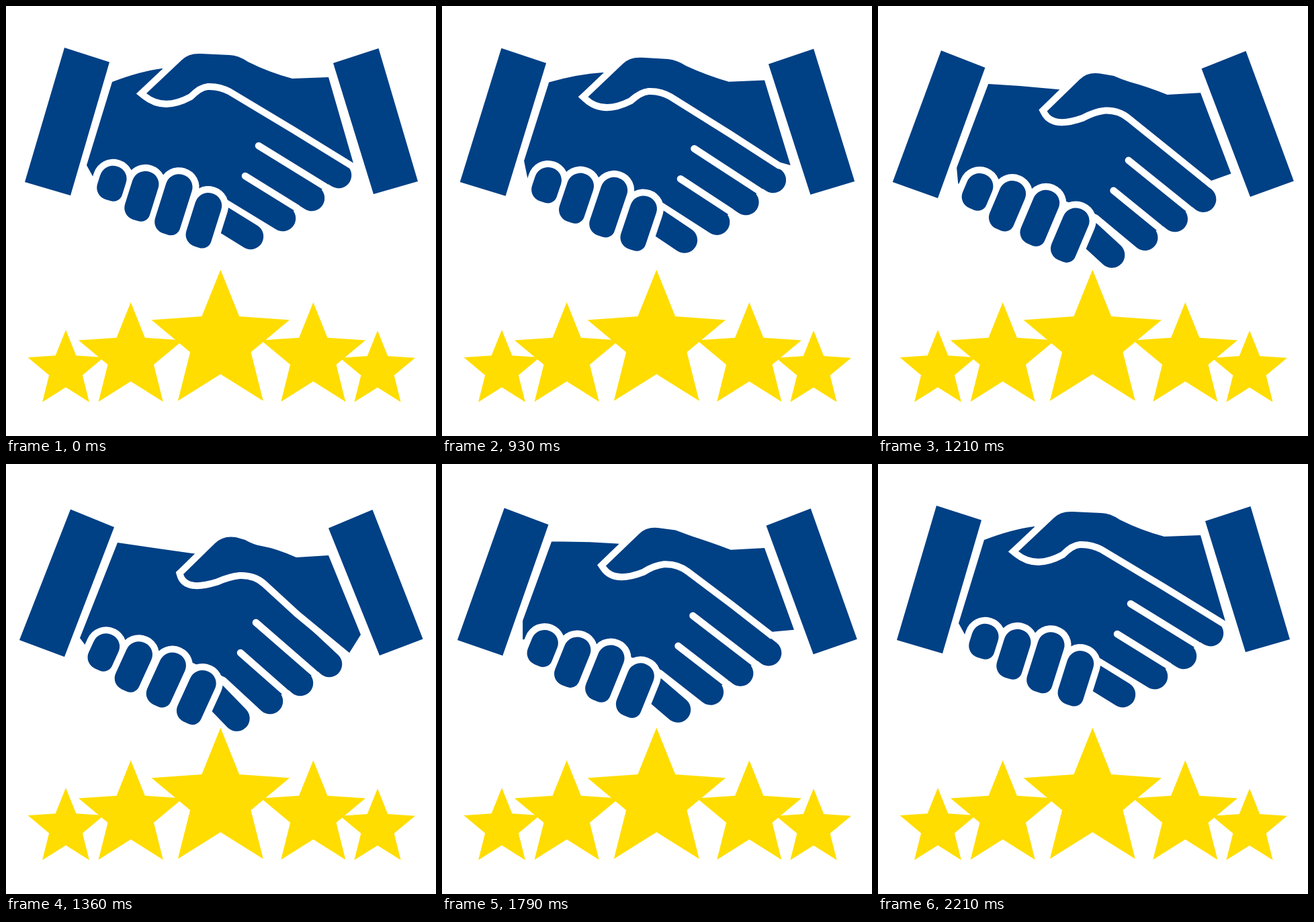
An HTML page with a canvas for the animation above (3.57 s loop, 640x640 px).

```html
<!DOCTYPE html>
<html lang="en">
<head>
<meta charset="utf-8">
<title>Handshake</title>
<style>
html, body { margin: 0; width: 100%; height: 100%; overflow: hidden; background: #fff; }
canvas { display: block; width: 100vmin; height: 100vmin; }
</style>
</head>
<body>
<canvas id="stage" width="640" height="640"></canvas>
<script>
const ctx = document.getElementById('stage').getContext('2d');
const LOOP = 3570, STEP = 71.4;
const BLUE = '#004085', YELLOW = '#ffdd00', WHITE = '#fff';

// Points are [x, y] raised, then [x, y] lowered, then an optional mid-way bulge.
const leftCuff = [[87, 62, 96, 67.5], [154, 83.5, 161, 94], [96, 282, 87, 287], [28, 262, 20, 262]];
const rightCuff = [[554.5, 63, 545.5, 68], [613, 261, 620.5, 260.5], [547, 280, 556, 285], [487, 85, 480, 95.5]];

const fingers = [
  { from: [320, 147, 374, 198], to: [495, 252, 481, 298] },
  { from: [366, 230, 360, 258], to: [455, 286, 438, 326] },
  { from: [338, 271, 340, 304], to: [412, 316, 393, 353] },
  { from: [322, 317, 311, 345], to: [364, 343, 343.5, 378.5] }
];
const notches = [[376, 208, 372, 236], [356, 253, 349, 281]];

const wrist = [[131, 257, 119, 271, -14, -20], [120, 237, 110, 259, 28, -77], [158, 113, 166, 117]];
const wristTop = [[200, 97, 220, 125], [232, 93, 277, 133]];
const palm = [[290, 100, 345, 140], [330, 130, 388, 186], ...fingers.slice(0, 3).map(f => f.to),
  [328, 288, 327, 318], [287, 273, 278, 296], [234, 253, 226, 281], [187, 244, 174, 262]];

// Upper hand: a point, or a control point and a point for a curve
const upperHand = [
  [[209, 130, 264, 164]],
  [[262, 80, 311, 118]],
  [[272, 70, 323, 106], [290, 71, 342, 109]],
  [[333, 73, 356, 113]],
  [[345, 73, 368, 120], [360, 83, 380, 122]],
  [[392, 99, 403, 126], [426, 108, 432, 139]],
  [[480, 106, 480, 136]],
  [[517, 234, 528, 254]],
  [[516, 233, 511, 281, -92, -59]],
  [[430, 180, 437, 220]],
  [[335, 123, 388, 175]],
  [[318, 114, 372, 160], [300, 115, 347, 161]],
  [[287, 116, 330, 163], [272, 131, 312, 171]],
  [[235, 151, 270, 184], [209, 130, 264, 164]]
];

const knuckles = [
  { at: [157.5, 263.5, 145.5, 279.5], len: [52, 56] },
  { at: [202, 282.5, 190, 301], len: [75, 77] },
  { at: [249.5, 295, 238.5, 320.5], len: [92, 84] },
  { at: [294.5, 318.5, 283.5, 346.5], len: [83, 83] }
];

// Top point and size
const stars = [[89, 482, 0.55], [185.7, 441, 0.757], [319.3, 392.5, 1], [457.3, 441, 0.757], [553, 483, 0.545]];

let pose = 0;
const mix = (a, b) => a + (b - a) * pose;

function place([ax, ay, bx, by, cx = 0, cy = 0]) {
  const bulge = pose * (1 - pose);
  return [mix(ax, bx) + cx * bulge, mix(ay, by) + cy * bulge];
}

function fillPath(color, build) {
  ctx.fillStyle = color;
  ctx.beginPath();
  build();
  ctx.closePath();
  ctx.fill();
}

function line(color, width, a, b) {
  ctx.strokeStyle = color;
  ctx.lineWidth = width;
  ctx.lineCap = 'round';
  ctx.beginPath();
  ctx.moveTo(...a);
  ctx.lineTo(...b);
  ctx.stroke();
}

const lineThrough = pts => pts.forEach(p => ctx.lineTo(...place(p)));
const curve = pts => ctx.quadraticCurveTo(...pts.flatMap(place));

function drawStar([x, top, size]) {
  const outer = 108 * size;
  fillPath(YELLOW, () => {
    for (let i = 0; i < 10; i++) {
      const r = i % 2 ? outer * 0.44 : outer, a = i * Math.PI / 5;
      ctx.lineTo(x + r * Math.sin(a), top + outer - r * Math.cos(a));
    }
  });
}

function drawLowerHand() {
  fillPath(BLUE, () => {
    lineThrough(wrist);
    curve(wristTop);
    lineThrough(palm);
  });
  for (const f of fingers) line(BLUE, 38.5, place(f.from), place(f.to));
  notches.forEach((n, i) => {
    const [x1, y1] = place(fingers[i].to), [x2, y2] = place(fingers[i + 1].to);
    line(WHITE, 10.5, place(n), [(x1 + x2) / 2, (y1 + y2) / 2]);
  });
}

function drawUpperHand() {
  fillPath(BLUE, () => {
    for (const part of upperHand) part.length > 1 ? curve(part) : lineThrough(part);
  });
  // white groove around the hand, kept outside by refilling
  ctx.strokeStyle = WHITE;
  ctx.lineWidth = 20;
  ctx.lineJoin = 'miter';
  ctx.miterLimit = 3;
  ctx.stroke();
  ctx.fill();
}

function drawKnuckle({ at, len }, color, grow) {
  const w = 40 + grow * 2, h = mix(...len) + grow * 2;
  ctx.save();
  ctx.translate(...place(at));
  ctx.rotate(mix(17.5, 24.5) * Math.PI / 180);
  fillPath(color, () => ctx.roundRect(-w / 2, -h / 2, w, h, [20, 19, 14, 18].map(r => r + grow)));
  ctx.restore();
}

const stepStart = k => Math.round(k * STEP / 10) * 10;

function stepAt(t) {
  const k = Math.floor(t / STEP);
  if (t < stepStart(k)) return k - 1;
  return t >= stepStart(k + 1) ? k + 1 : k;
}

const ease = u => (1 - Math.cos(Math.PI * Math.min(1, Math.max(0, u)))) / 2;

// Hands sink and rise once per loop
function dip(step) {
  if (step < 11 || step >= 31) return 0;
  const t = step * STEP;
  return 1.047 * (t < 1450 ? ease((t - 755) / 695) : 1 - ease((t - 1440) / 800));
}

function draw(t) {
  pose = dip(stepAt(t));
  ctx.fillStyle = WHITE;
  ctx.fillRect(0, 0, 640, 640);
  drawLowerHand();
  drawUpperHand();
  for (const k of knuckles) drawKnuckle(k, WHITE, 10);
  for (const k of knuckles) drawKnuckle(k, BLUE, 0);
  for (const cuff of [leftCuff, rightCuff]) fillPath(BLUE, () => lineThrough(cuff));
  stars.forEach(drawStar);
}

const start = performance.now();
function tick() {
  draw((performance.now() - start) % LOOP);
  requestAnimationFrame(tick);
}
tick();
</script>
</body>
</html>
```
